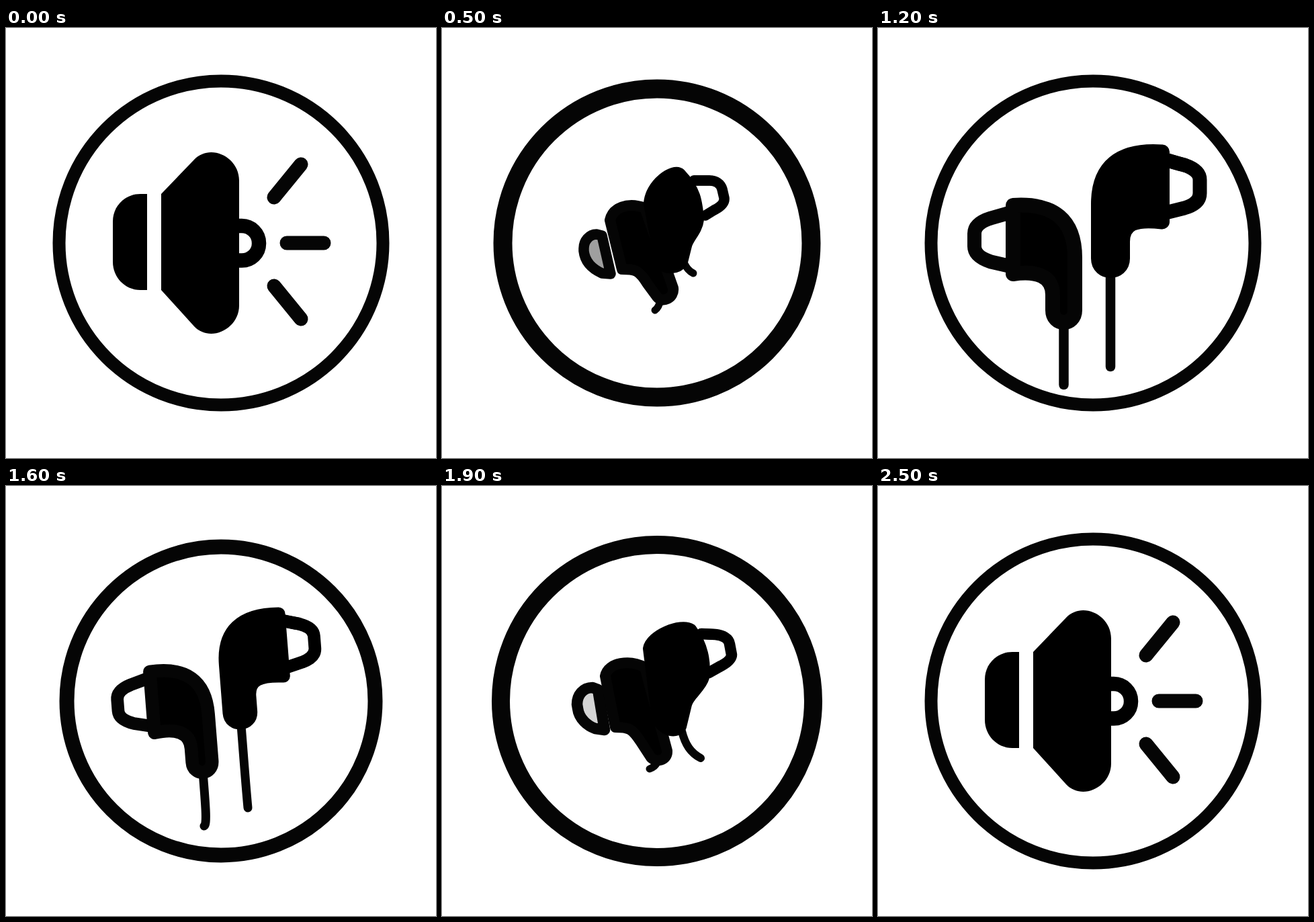
An HTML page that plays this animation: 640x640 px, repeating every 2700 ms.

```html
<!DOCTYPE html>
<html lang="en">
<head>
<meta charset="utf-8">
<title>Speaker and earbuds</title>
<style>
  html, body { margin: 0; width: 100%; height: 100%; overflow: hidden; background: #fff; }
  svg { display: block; width: 100%; height: 100%; }
  path, circle { stroke: #050505; stroke-linecap: round; stroke-linejoin: round; fill: none; }
  .solid { fill: #000; }
  .black { stroke: #000; }
</style>
</head>
<body>
<svg viewBox="0 0 640 640">
  <circle cx="320" cy="320"/>
  <path/>
  <path/>
  <path/>
  <path/>
  <path class="solid"/>
  <path class="solid black"/>
  <path class="black"/>
</svg>
<script>
const LOOP = 2700, STEP = 100;
const ring = document.querySelector('circle');
const paths = [...document.querySelectorAll('path')];
const leftTip = paths[3];

// Each pose: ring radius and width, grey level of the left tip, then "width outline" for
// left wire, right wire, upper ray, left tip, left bud, right bud, right tip.
const speaker = ['241 19', '0',
  '21 M399,384 C412,400 426,417 439,433',
  '21 M418,320 C436,320 455,320 473,320',
  '21 M399,252 C412,236 426,219 439,203',
  '0 M210,247 L200,247 C177,247 159,265 159,288 L159,348 C159,371 177,390 200,390 L210,390Z',
  '0 M235,250 C270,215 320,210 340,240 L340,400 C340,440 290,440 280,430 L250,400 C245,396 240,392 235,388 C235,340 235,295 235,250Z',
  '0 M347,227 C347,192 304,171 280,196 L231,247 C231,295 231,342 231,390 L280,444 C304,469 347,448 347,413 C347,351 347,289 347,227Z',
  '21.5 M345,294.5 L351,294.5 C365,294.5 376.5,306 376.5,320 L376.5,321 C376.5,335 365,346 351,346 L345,346'];

const folding = ['229.5 28', '159',
  '11 M325,405 C323,415 320,418 317,420',
  '11 M358,345 C364,358 368,362 374,365',
  '15 M375,227 C382,227 390,227 398,227',
  '15.5 M238,309 L230,307 C219,307 211,317 211,328 L211,332 C213,350 227,360 238,365 L251,366Z',
  '16 M250,286 C254,268 276,258 302,268 L344,387 C346,402 328,410 320,400 L306,381 C293,360 288,359 268,359 C262,335 256,310 250,286Z',
  '16 M355,217 C345,207 309,232 308,262 L325,350 C330,360 352,360 358,348 L364,324 C367,312 380,302 382,285 C380,258 377,240 355,217Z',
  '15.5 M375,227 L398,227 C408,227 415,232 417,240 L420,253 C421,261 413,267 405,271 L392,279'];

const closing = ['232.5 27', '212',
  '11 M322,408 C318,417 314,419 309,421',
  '12 M357,365 C362,385 370,397 385,405',
  '16 M386,220 C393,220 400,221 407,221',
  '16.5 M232,303 L224,300 C210,300 201,311 201,325 L202,331 C204,347 217,357 228,361 L242,363Z',
  '16 M243,283 C247,262 280,258 302,270 L335,394 C336,409 318,412 311,404 L296,381 C283,361 279,359 258,359 C253,334 248,308 243,283Z',
  '16 M371,213 C355,203 310,222 307,242 L320,345 C328,368 352,368 356,358 L364,325 C367,312 386,300 390,285 C393,262 388,236 371,213Z',
  '16.5 M386,220 L407,221 C418,222 427,227 428,235 L431,251 C431,259 421,265 413,269 L397,278'];

const buds = ['241 19', '255',
  '14.5 M276.5,435 C276.5,467 276.5,499 276.5,531',
  '14.5 M346,360 C346,408 346,456 346,504',
  '21 M428,196 C437,199 447,202 456,204',
  '21 M203,273 L168,283 C152,288 143.5,296 143.5,306 L143.5,325 C143.5,336 153,343 168,348 L203,356Z',
  '22 M201,264 C262,260 293,286 293,342 L293,420 C293,444 260,444 260,420 L260,397 C260,369 236,361 201,366 C201,332 201,298 201,264Z',
  '22 M423,184.5 C360,180 328,206 328,262 L328,343 C328,367 364,367 364,343 L364,318 C364,290 384,284 423,288.5 C423,254 423,219 423,184.5Z',
  '21 M428,196 L456,204 C471,209 479,216 479,226 L479,246 C479,257 470,264 456,268 L428,275'];

// Turns and scales the buds about the centre; ring and wires are given.
function tilt(deg, scale, dx, dy, ringSize, wires) {
  const c = Math.cos(deg * Math.PI / 180) * scale, s = Math.sin(deg * Math.PI / 180) * scale;
  const move = part => part
    .replace(/^[\d.]+/, w => w * scale)
    .replace(/([\d.]+),([\d.]+)/g, (_, px, py) => {
      const x = px - 320, y = py - 320;
      return (320 + dx + x * c - y * s).toFixed(1) + ',' + (320 + dy + x * s + y * c).toFixed(1);
    });
  return [ringSize, '255', ...wires, ...buds.slice(4).map(move)];
}

const settling = tilt(1, 0.985, 0, 0, '240.2 19.4', [
  '14 M276,435 C276,500 275,523 272,523',
  '14 M344,360 C343,430 344,480 350,486']);
const leaning = tilt(-4.5, 0.892, 3.6, -2, '229.5 22', [
  '13 M293,425 C296,465 300,504 295,506',
  '13 M349.5,350 C353,393 356,436 360,479']);

const smooth = u => u * u * (3 - 2 * u);
const easeOut = u => 1 - (1 - u) ** 2;
const linear = u => u;

// [time, pose, easing towards the next pose]
const keys = [
  [0, speaker, linear], [100, speaker, smooth], [500, folding, easeOut],
  [800, settling, easeOut], [1200, buds, linear], [1500, buds, linear],
  [1600, leaning, linear], [1900, closing, smooth], [2500, speaker, linear],
  [LOOP, speaker, linear]];

function mix(a, b, u) {
  const ends = b.match(/[\d.]+/g);
  let i = 0;
  return a.replace(/[\d.]+/g, n => (+n + (ends[i++] - n) * u).toFixed(2));
}

function draw() {
  const t = Math.floor(performance.now() % LOOP / STEP) * STEP;
  const k = keys.findIndex((key, i) => t < keys[i + 1][0]);
  const [start, from, ease] = keys[k], [end, to] = keys[k + 1];
  const u = ease((t - start) / (end - start));
  const [size, grey, ...parts] = from.map((part, i) => mix(part, to[i], u));

  const [r, width] = size.split(' ');
  ring.setAttribute('r', r);
  ring.setAttribute('stroke-width', width);
  leftTip.style.fill = `rgb(${grey},${grey},${grey})`;
  parts.forEach((part, i) => {
    const cut = part.indexOf(' ');
    paths[i].setAttribute('stroke-width', part.slice(0, cut));
    paths[i].setAttribute('d', part.slice(cut + 1));
  });
  requestAnimationFrame(draw);
}
draw();
</script>
</body>
</html>
```
